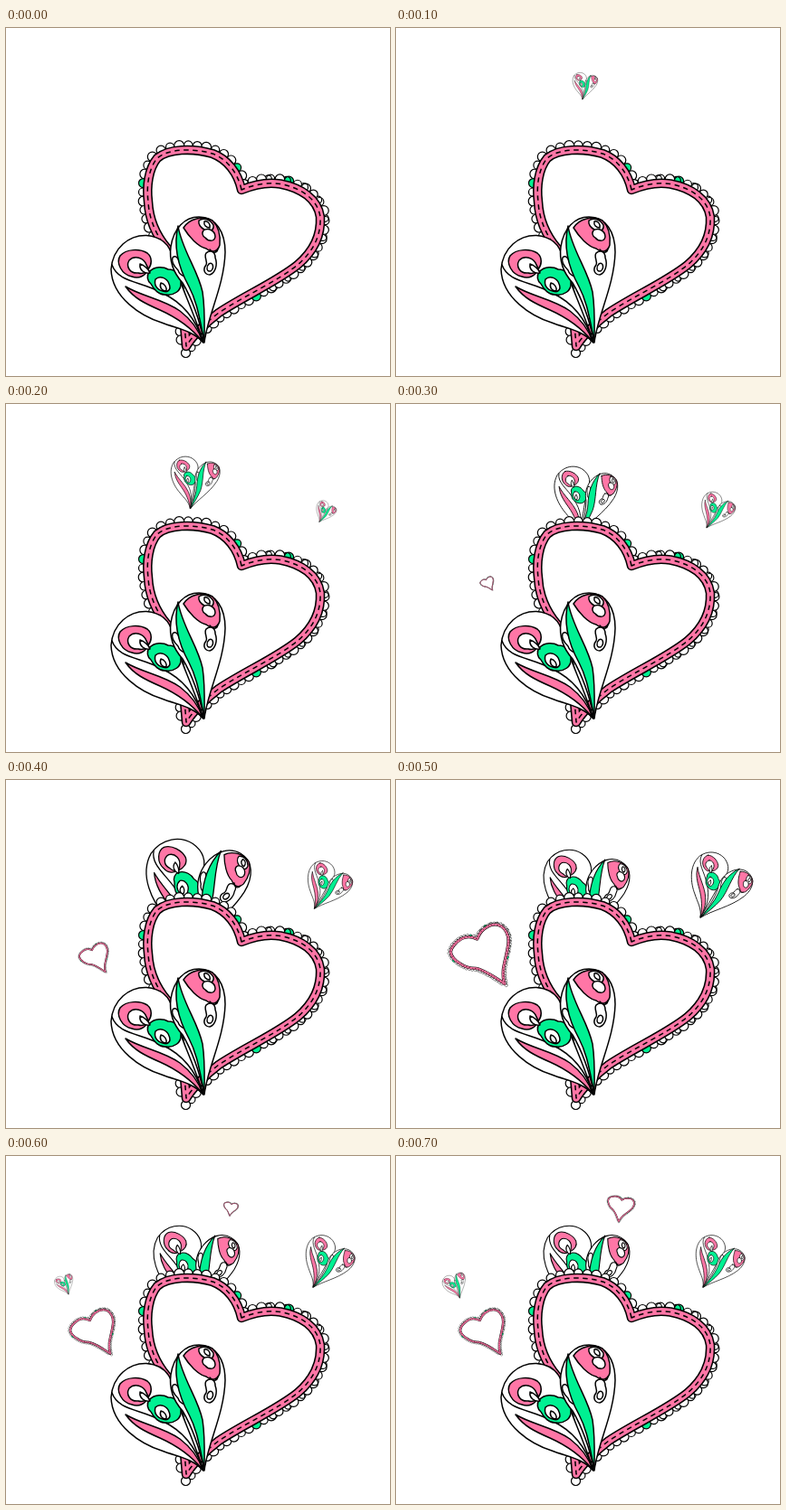
An HTML page for the animation above (0.8 s loop, 424 by 385 pixels).

```html
<!DOCTYPE html>
<html lang="en">
<head>
<meta charset="utf-8">
<title>Hearts</title>
<style>
  html, body { margin: 0; width: 100%; height: 100%; overflow: hidden; background: #fff; }
  svg { display: block; width: 100vw; height: 100vh; }
  .line { fill: none; stroke: #000; stroke-width: 1.5; stroke-linecap: round; stroke-linejoin: round; }
  .band { fill: none; stroke-linejoin: round; }
  .white { fill: #fff; }
  .pink { fill: #ff76a6; }
  .green { fill: #00f092; }
  #scallops { stroke-width: 1.2; }

  /* Stepping variables keeps every heart in the normal paint order and sharp */
  .mover {
    --x: 0px; --y: 0px; --k: 0;
    transform: translate(var(--x), var(--y)) scale(var(--k));
    animation: 800ms step-end infinite;
  }
  #top { animation-name: top; }
  #right { animation-name: right; }
  #lace { animation-name: lace; }
  #bud { animation-name: bud; }
  #crown { animation-name: crown; }

  @keyframes top {
    0% { --x: 0px; --y: 0px; --k: 0; }
    12.5% { --x: 206px; --y: 79px; --k: .21; }
    25% { --x: 203.5px; --y: 116px; --k: .41; }
    37.5% { --x: 202.5px; --y: 144px; --k: .53; }
    50% { --x: 200.5px; --y: 189px; --k: .875; }
    62.5%, 100% { --x: 200.5px; --y: 179px; --k: .72; }
  }
  @keyframes right {
    0% { --x: 0px; --y: 0px; --k: 0; }
    25% { --x: 346px; --y: 130.5px; --k: .17; }
    37.5% { --x: 343px; --y: 137px; --k: .285; }
    50% { --x: 340.5px; --y: 142.5px; --k: .38; }
    62.5% { --x: 336px; --y: 152.5px; --k: .52; }
    75%, 100% { --x: 339px; --y: 145.5px; --k: .415; }
  }
  @keyframes lace {
    0% { --x: 0px; --y: 0px; --k: 0; }
    37.5% { --x: 107px; --y: 206.5px; --k: .07; }
    50% { --x: 111px; --y: 213.5px; --k: .15; }
    62.5% { --x: 122.5px; --y: 228px; --k: .31; }
    75%, 100% { --x: 117px; --y: 220.5px; --k: .23; }
  }
  @keyframes bud {
    0% { --x: 0px; --y: 0px; --k: 0; }
    75% { --x: 69px; --y: 153px; --k: .16; }
    87.5%, 100% { --x: 70.5px; --y: 157px; --k: .2; }
  }
  @keyframes crown {
    0% { --x: 0px; --y: 0px; --k: 0; }
    75% { --x: 247px; --y: 67px; --k: .07; }
    87.5%, 100% { --x: 246px; --y: 74px; --k: .13; }
  }
</style>
</head>
<body>
<svg viewBox="0 0 424 385" preserveAspectRatio="none">
  <defs>
    <path id="rim" d="M260 179C256 160 244 145 228 139C206 132.500 179 133.500 167 144C157 156 155 176 157 192C158 213 167 231 178 244C190 264 196 312 199 352C205 342 219 327 235 315C262 297 300 280 322 262C341 246 348 227 347 209C344 189 326 177 303 172.500C288 170 272 174 260 179Z"/>

    <!-- Both hearts have their tip at the origin -->
    <g id="frame" transform="translate(-198 -363)">
      <g id="scallops" class="line"></g>
      <use href="#rim" class="band" style="fill:#fff" stroke="#000" stroke-width="10.5"/>
      <use href="#rim" class="band" stroke="#ff76a6" stroke-width="7.4"/>
      <use href="#rim" class="band" stroke="#000" stroke-width="1.5" stroke-dasharray="5.5 4.5"/>
    </g>

    <g id="paisley" class="line" transform="translate(-219 -349)">
      <!-- left lobe -->
      <path class="white" d="M218 348C205 334 190 333 172 326C150 319 117 299 116 267C118 243 136 229 155 229.500C172 231 181 240 184 254C190 280 206 310 218 348Z"/>
      <path d="M117 262C124 282 150 280 172 293C196 304 210 322 218 348"/>
      <path class="pink" d="M132 286C150 297 174 300 192 313C205 323 213 334 217 347C205 332 190 321 170 312C154 305 141 299 132 286Z"/>
      <path class="pink" d="M126 252C133 244 148 244 156 249C162 254 161 262 157 267C154 274 147 278 139 275C128 273 121 260 126 252Z"/>
      <path class="white" d="M136 257C142 251 152 254 155 262C159 268 153 273 146 271C137 272 132 264 136 257Z"/>
      <path class="green" d="M158 270C164 263 174 264 179 267C188 267 194 274 193 282C194 291 185 296 177 295C169 296 163 289 160 283C156 280 155 274 158 270Z"/>
      <path class="white" d="M148 261C152 262 158 267 159 271C153 272 147 268 148 261Z"/>
      <path class="white" d="M165 278C170 273 178 277 180 283C183 290 178 293 173 291C167 290 163 284 165 278Z"/>
      <path class="white" d="M171 282C175 283 178 287 177 291C172 291 169 287 171 282Z"/>
      <!-- right lobe -->
      <path class="white" d="M219 348C213 320 205 299 195 282C185 271 180 257 182 242C185 222 197 209 213 209C232 209 242 226 242 248C241 286 222 319 219 348Z"/>
      <path class="pink" d="M196 221C202 211 218 207 228 213C235 220 237 230 236 240C234 248 227 249 221 244C212 242 202 231 196 221Z"/>
      <path class="white" d="M184 254C188 250 191 257 194 263C200 259 205 266 204 272C200 278 192 274 190 268C187 265 182 259 184 254Z"/>
      <path class="green" d="M190 219C194 245 212 268 217 292C220 312 219 330 219 346C214 325 212 305 202 286C191 266 184 244 190 219Z"/>
      <path class="white" d="M213 213C218 209 226 212 229 218C230 224 224 227 219 223C215 221 212 217 213 213Z"/>
      <path class="white" d="M219 214C223 213 226 217 225 221C221 221 218 218 219 214Z"/>
      <path class="white" d="M218 224C224 220 231 225 231 231C230 237 223 236 220 232C217 230 216 227 218 224Z"/>
      <path class="white" d="M221 249C225 245 231 247 231 254C234 262 231 271 225 273C219 273 217 267 221 262C223 258 218 253 221 249Z"/>
      <path class="white" d="M224 261C229 258 230 266 226 269C221 270 221 264 224 261Z"/>
      <path d="M225 245C229 250 233 249 234 244"/>
    </g>
  </defs>

  <rect width="424" height="385" fill="#fff"/>
  <g id="top" class="mover"><g transform="rotate(31)"><use href="#paisley"/></g></g>
  <use href="#frame" x="198" y="363"/>
  <use href="#paisley" x="219" y="349"/>
  <g id="right" class="mover"><g transform="rotate(51)"><use href="#paisley"/></g></g>
  <g id="lace" class="mover"><g transform="scale(1.08 1) rotate(-49)"><use href="#frame"/></g></g>
  <g id="bud" class="mover"><g transform="rotate(4)"><use href="#paisley"/></g></g>
  <g id="crown" class="mover"><g transform="scale(1.12 1) rotate(-12)"><use href="#frame"/></g></g>
</svg>
<script>
  const rim = document.getElementById('rim');
  const scallops = document.getElementById('scallops');
  const greenSpots = [[153, 172], [255, 157], [317, 168], [275, 297]];

  function circle(x, y, r, cls) {
    const c = document.createElementNS('http://www.w3.org/2000/svg', 'circle');
    Object.entries({ cx: x, cy: y, r, class: cls }).forEach(([k, v]) => c.setAttribute(k, v));
    scallops.append(c);
    return { c, x, y };
  }

  // Lace beads sit just outside the rim, each overlapping the one before
  const total = rim.getTotalLength();
  const count = Math.round(total / 9.5);
  const beads = [];
  for (let i = 0; i < count; i++) {
    const at = total * (i + .5) / count;
    const p = rim.getPointAtLength(at);
    const q = rim.getPointAtLength(Math.min(at + .5, total));
    const d = Math.hypot(q.x - p.x, q.y - p.y) || 1;
    const tx = (q.x - p.x) / d, ty = (q.y - p.y) / d;
    const r = 5 + .5 * Math.sin(i * 2.3);
    const x = p.x - ty * 5.2, y = p.y + tx * 5.2;
    beads.push(circle(x, y, r, 'white'));
    if (p.x > 285 && i % 2) circle(x + tx * 2.5, y + ty * 2.5, r - .8, '');
  }
  circle(198.5, 359.5, 5, 'white');
  for (const [x, y] of greenSpots) {
    const dist = b => Math.hypot(b.x - x, b.y - y);
    beads.reduce((a, b) => dist(b) < dist(a) ? b : a).c.setAttribute('class', 'green');
  }
</script>
</body>
</html>
```
